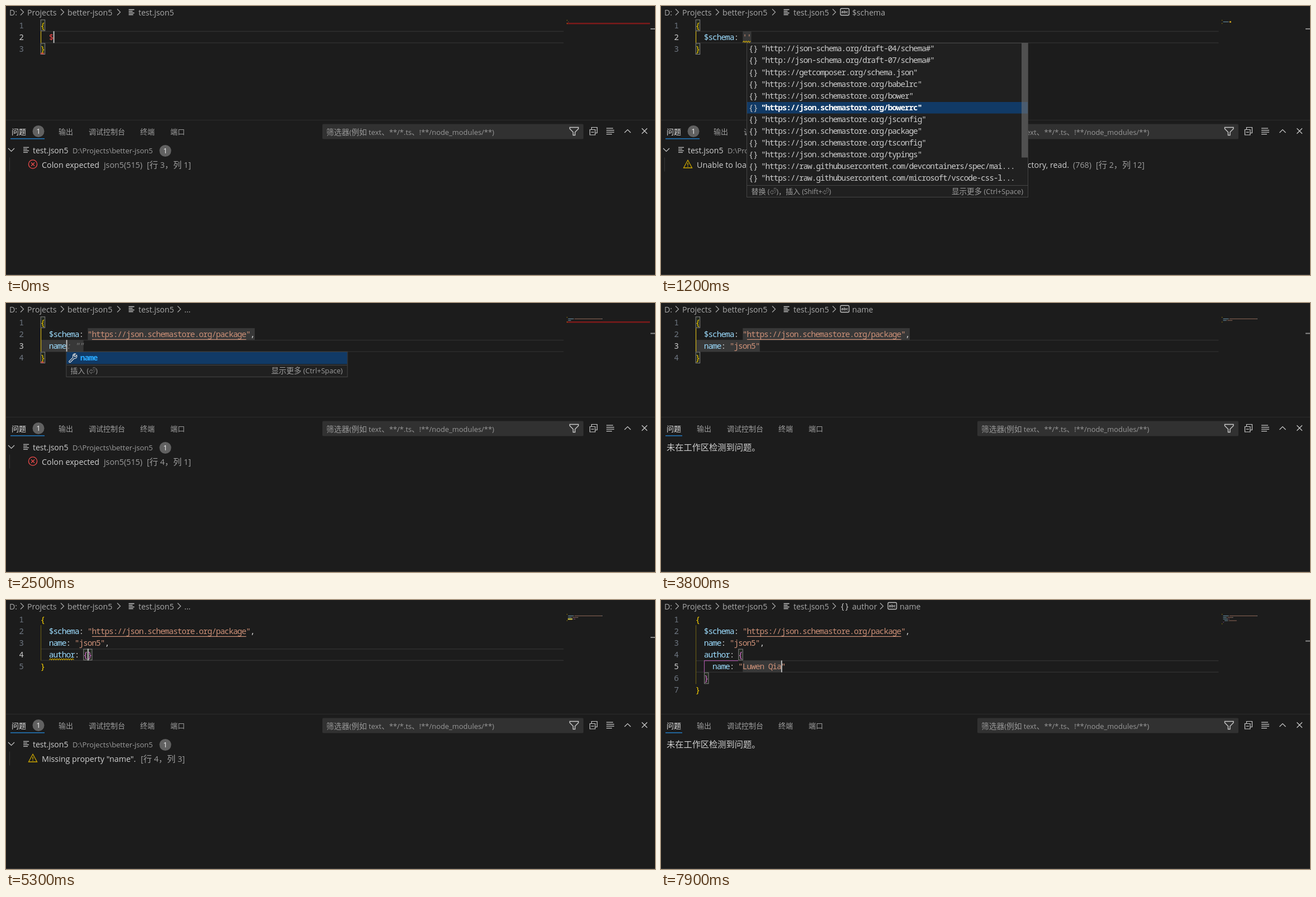
Animation, 1161 px wide and 482 px high, one loop 8000 ms. Source, as an HTML page:

```html
<!DOCTYPE html>
<html lang="zh-CN">
<head>
<meta charset="utf-8">
<title>JSON5 completion</title>
<style>
html,body{margin:0;width:100%;height:100%;overflow:hidden;background:#1c1c1c}
svg{display:block;width:100%;height:100%}
text{white-space:pre;font-family:"Open Sans","Noto Sans CJK SC","Noto Sans CJK",sans-serif}
.cjk{font-size:1.065em}
.mono{font:14.5px "Noto Sans Mono","DejaVu Sans Mono",monospace;font-stretch:condensed;text-anchor:middle}
.bold{font-weight:700}
.ghost{font-style:italic}
</style>
</head>
<body>
<svg id="stage" viewBox="0 0 1161 482"></svg>
<script>
const stage = document.getElementById('stage');
const LOOP = 8000, STEP = 100;
const X0 = 62, CELL = 7.66, Y0 = 24, ROW = 21.1;
const RED = '#f14c4c', YELLOW = '#cca700', GREY = '#9d9d9d', LIGHT = '#d4d4d4';
const colX = c => X0 + c * CELL;
const rowY = r => Y0 + r * ROW;

// Drawing helpers
const esc = s => s.replace(/&/g, '&amp;').replace(/</g, '&lt;');
const rect = (x, y, w, h, fill, more = '') =>
  `<rect x="${x}" y="${y}" width="${w}" height="${h}" fill="${fill}" ${more}/>`;
const line = (d, color, w = 1.2) =>
  `<path d="${d}" fill="none" stroke="${color}" stroke-width="${w}"/>`;
const label = (x, y, s, fill = LIGHT, size = 14.3, more = '') =>
  `<text x="${x}" y="${y}" fill="${fill}" font-size="${size}" ${more}>` +
  esc(s).replace(/[\u3000-\uffef]+/g, m => `<tspan class="cjk">${m}</tspan>`) + '</text>';
const mono = (x, y, s, fill, cls = '', cell = CELL) => {
  const xs = [...s].map((_, i) => (x + (i + .5) * cell).toFixed(2)).join(' ');
  return `<text class="mono ${cls}" x="${xs}" y="${y}" fill="${fill}">${esc(s)}</text>`;
};
const bars = (x, y, color, s = 1) =>
  line([10, 7, 10, 8].map((w, i) => `M${x} ${y + i * 3 * s}h${w * s}`).join(''), color, 1.3);
const badge = (x, y, n) => `<circle cx="${x}" cy="${y}" r="10.5" fill="#616161"/>` +
  label(x, y + 4.8, String(n), '#f8f8f8', 13, 'text-anchor="middle"');
const squiggle = (x1, x2, y, color) => {
  let d = `M${x1} ${y}`;
  for (let x = x1 + 2, i = 0; x <= x2; x += 2, i++) d += `L${x} ${y + (i % 2 ? 0 : -2.4)}`;
  return line(d, color, 1.1);
};

// Problems
const err = (r, c) => ({ icon: 'error', text: 'Colon expected', code: 'json5(515)', codeX: 175, pos: `[行 ${r}，列 ${c}]`, posX: 252 });
const missing = { icon: 'warn', text: 'Missing property "name".', pos: '[行 4，列 3]', posX: 241 };
const unloaded = {
  icon: 'warn', text: "Unable to load schema from 'd:\\Projects\\better-json5':",
  tail: 'operation on a directory, read.', code: '(768)', codeX: 737, pos: '[行 2，列 12]', posX: 778
};

// Document states
const AUTHOR = 'Luwen Qia';
const schema = '  $schema: "https://json.schemastore.org/package"';
const pkg = '  name: "json5",';
const simple = (...body) => ['{', ...body, '}'];
const nested = s => simple(schema + ',', pkg, '  author: {', s, '  }');
const urlMark = [1, 11, 50];
const beats = [
  [0, { lines: simple('  $'), row: 1, col: 3, caret: 1, crumbs: [], probs: [err(3, 1)], boxes: [[0, 0], [2, 0]],
    marks: [], waves: [[RED, 2, 0, 1]], bands: [['#7d1a1a', 2, 0, 149]], ghost: '', pop: null, list: false }],
  [2, { pop: ['$schema', 1] }],
  [4, { lines: simple("  $schema: ''"), col: 12, caret: 0, crumbs: [['abc', '$schema']], probs: [unloaded],
    marks: [[1, 11, 13]], waves: [[YELLOW, 1, 11, 13]], bands: [[YELLOW, 1, 14, 17]], pop: null, list: true }],
  [15, { lines: simple(schema), col: 49, caret: 1, probs: [], marks: [[1, 11, 49]], waves: [], bands: [], list: false }],
  [18, { lines: simple(schema + ','), col: 50, crumbs: [['', '...']], marks: [urlMark] }],
  [19, { lines: simple(schema + ',', '  '), row: 2, col: 2, boxes: [[0, 0], [3, 0]], marks: [urlMark, [2, 0, 2]] }]
];
for (let i = 1; i <= 4; i++) beats.push([21 + i, {
  lines: simple(schema + ',', '  ' + 'name'.slice(0, i)), col: 2 + i, ghost: 'name'.slice(i) + ': ""',
  pop: ['name', i], probs: [err(4, 1)], marks: [urlMark, [2, 0, 10]],
  waves: [[RED, 3, 0, 1]], bands: [['#7d1a1a', 3, 0, 149]]
}]);
beats.push([28, { ghost: '', pop: null, probs: [], waves: [], bands: [], crumbs: [['abc', 'name']] }]);
for (let i = 0; i <= 5; i++) beats.push([i ? 29 + i : 28, {
  lines: simple(schema + ',', `  name: "${'json5'.slice(0, i)}"`), col: 9 + i, marks: [urlMark, [2, 0, 10 + i]]
}]);
beats.push(
  [37, { col: 15 }],
  [38, { caret: 0 }],
  [39, { lines: simple(schema + ',', pkg), col: 16, caret: 1 }],
  [40, { lines: simple(schema + ',', pkg, '  '), row: 3, col: 2, crumbs: [['', '...']], marks: [], boxes: [[0, 0], [4, 0]] }],
  [45, { caret: 0 }],
  [46, { caret: 1 }]
);
for (let i = 1; i <= 2; i++) beats.push([48 + i, {
  lines: simple(schema + ',', pkg, '  ' + 'au'.slice(0, i)), col: 2 + i, ghost: 'author'.slice(i) + ': {}',
  pop: ['author', i], probs: [err(5, 1)], waves: [[RED, 4, 0, 1]], bands: [['#7d1a1a', 4, 0, 149]]
}]);
beats.push(
  [51, { lines: simple(schema + ',', pkg, '  author: {}'), col: 11, ghost: '', pop: null, probs: [missing],
    boxes: [[3, 10], [3, 11]], waves: [[YELLOW, 3, 2, 8]], bands: [[YELLOW, 3, 2, 10]] }],
  [54, { crumbs: [['{}', 'author']] }],
  [55, { lines: nested('    '), row: 4, col: 4, boxes: [[3, 10], [5, 2]] }],
  [58, { caret: 0 }],
  [59, { caret: 1 }]
);
for (let i = 1; i <= 2; i++) beats.push([61 + i, {
  lines: nested('    ' + 'na'.slice(0, i)), col: 4 + i, ghost: 'name'.slice(i) + ': ""', pop: ['name', i],
  probs: [err(6, 3), missing], marks: [[4, 0, 12], [5, 0, 3]],
  waves: [[YELLOW, 3, 2, 8], [RED, 5, 2, 3]], bands: [['#7d6a10', 3, 0, 149], ['#7d1a1a', 5, 0, 149]]
}]);
beats.push([68, { ghost: '', pop: null, probs: [], waves: [], bands: [], crumbs: [['{}', 'author'], ['abc', 'name']] }]);
for (let i = 0; i <= AUTHOR.length; i++) beats.push([i ? 70 + i : 68, {
  lines: nested(`    name: "${AUTHOR.slice(0, i)}"`), col: 11 + i, marks: [[4, 11, 11 + i]]
}]);

const stateAt = step => Object.assign({}, ...beats.filter(b => b[0] <= step).map(b => b[1]));

function tokens(text) {
  return [...text.matchAll(/"[^"]*"?|'[^']*'?|[\w$]+|[{}]|[:,]/g)].map(m => {
    const s = m[0], col = m.index;
    let color = '#9cdcfe';
    if (/["']/.test(s)) color = '#ce9178';
    else if (/[{}]/.test(s)) color = col ? '#da70d6' : '#ffd700';
    else if (/[:,]/.test(s)) color = LIGHT;
    else if (s === '$') color = '#f44747';
    return { s, col, color };
  });
}

// Breadcrumbs
const chevron = x => line(`M${x - 3} 5.5l5.5 5.5l-5.5 5.5`, '#a9a9a9');
function breadcrumbs(crumbs) {
  let out = label(6, 17, 'D:', '#a9a9a9', 14.1) + chevron(29) + label(38, 17, 'Projects', '#a9a9a9', 14.1) +
    chevron(101) + label(110, 17, 'better-json5', '#a9a9a9', 14.1) + chevron(202) +
    bars(219.5, 6.5, '#c5c5c5') + label(237, 17, 'test.json5', '#a9a9a9', 14);
  crumbs.forEach(([icon, name], i) => {
    const x = 310 + i * 85;
    out += chevron(x);
    if (icon === 'abc') out += rect(x + 11, 4.5, 15.5, 12, 'none', 'rx="2" stroke="#c5c5c5" stroke-width="1.3"') +
      label(x + 18.7, 13, 'abc', '#c5c5c5', 7, 'text-anchor="middle" font-weight="700"');
    if (icon === '{}') out += mono(x + 10.5, 16, '{}', '#c5c5c5', '', 8);
    out += label(x + (icon ? 32 : 9), 17, name, '#a9a9a9', 14.1);
  });
  return out;
}

function editor(s) {
  const last = s.lines.length - 1, inner = s.row === 4, dim = s.row === 4 || s.boxes[0][0] === 3;
  const y = rowY(s.row);
  let out = line(`M${X0} ${y + .4}H997.5M${X0} ${y + ROW - .2}H997.5`, '#2f2f2f', 1.4);
  for (const [r, a, b] of s.marks) out += rect(colX(a), rowY(r), (b - a) * CELL, ROW, '#383838');
  for (const [r, c] of s.boxes) out += rect(colX(c) + .2, rowY(r) + .8, CELL - .2, ROW - 1.6, '#23291f', 'stroke="#858585"');
  out += line(`M62.5 ${rowY(1)}V${rowY(last)}`, dim ? '#655a16' : '#d3b51c');
  if (inner) out += line(`M138 ${y + .2}H77.5V${y + ROW}`, '#a757a5');
  s.lines.forEach((text, r) => {
    const base = +(rowY(r) + 15.7).toFixed(2);
    out += mono(23.8, base, String(r + 1), r === s.row ? '#cccccc' : '#6e7681');
    for (const t of tokens(text)) {
      out += mono(colX(t.col), base, t.s, t.color);
      if (t.s.startsWith('"https')) out += rect(colX(t.col + 1), base + 4, (t.s.length - 2) * CELL, 1.2, t.color);
    }
  });
  if (s.ghost) out += mono(colX(s.col), y + 15.7, s.ghost, '#7c7c7c', 'ghost');
  for (const [c, r, a, b] of s.waves) out += squiggle(colX(a), colX(b), rowY(r + 1) - 1, c);
  if (s.caret) out += rect(colX(s.col) - .3, y, 1.8, ROW, '#c8c8c8');
  return out;
}

function minimap(s) {
  const at = r => 24.2 + 2.85 * r;
  let out = '';
  for (const [c, r, a, b] of s.bands) out += rect(1003 + a, at(r) + .2, b - a, 2.5, c);
  s.lines.forEach((text, r) => {
    for (const t of tokens(text))
      out += rect(1003 + t.col * 1.28, at(r) + .8, t.s.length * 1.28, 1.2, t.color, 'opacity=".55"');
  });
  return out + rect(1153, [0, 40, 53.5, 66, 72.5][s.row], 8, 2, '#8a8a8a');
}

function problem(p, i) {
  const y = 283.5 + i * 25.6, base = y + 6;
  let out = line(`M6.5 ${y - 12}v25`, '#363636', 1);
  if (p.icon === 'error')
    out += `<circle cx="48" cy="${y}" r="7.6" fill="none" stroke="${RED}" stroke-width="1.3"/>` +
      line(`M45 ${y - 3}l6 6m0 -6l-6 6`, RED);
  else
    out += line(`M48 ${y - 7.2}L55.5 ${y + 6.5}H40.5Z`, YELLOW, 1.3) + line(`M48 ${y - 2.5}v4.5m0 1.3v1.5`, YELLOW, 1.4);
  out += label(64, base, p.text, '#d0d0d0');
  if (p.tail) out += label(730, base, p.tail, '#d0d0d0', 14.3, 'text-anchor="end"');
  if (p.code) out += label(p.codeX, base, p.code, GREY);
  return out + label(p.posX, base, p.pos, GREY);
}

function panel(probs) {
  const n = probs.length, shift = n ? 30 : 0;
  let out = rect(0, 204, 1161, 1, '#2c2c2c') + label(10, 230, '问题', '#e7e7e7', 12.2);
  if (n) out += badge(58, 224.5, n);
  out += rect(8, 237.2, n ? 61 : 30, 1.3, '#2489db');
  [[64, '输出'], [118, '调试控制台'], [210, '终端'], [264, '端口']]
    .forEach(([x, name]) => out += label(x + shift, 230, name, GREY, 12.2));
  out += rect(566, 211.5, 467, 27, '#313131', 'rx="2"') +
    label(573, 230.5, '筛选器(例如 text、**/*.ts、!**/node_modules/**)', '#989898', 12.9) +
    line('M1008.5 217.5h15.5v2.5l-6 6v5.5h-3.5v-5.5l-6 -6z', '#c8c8c8', 1.4) +
    line('M1047.5 221v-3.5h10v10h-3.5M1044.5 221.5h9.5v9.5h-9.5zM1046.8 226.2h5', '#c8c8c8') +
    line('M1074 219.2h12M1074 222.7h14M1074 226.2h14M1074 229.7h10', '#c8c8c8') +
    line('M1106.5 227l5.5 -5.5l5.5 5.5', '#c8c8c8') +
    line('M1137.5 219.2l9.5 9.5m0 -9.5l-9.5 9.5', '#c8c8c8', 1.3);
  if (!n) return out + label(10, 264, '未在工作区检测到问题。', '#d0d0d0', 14.3);
  return out + line('M4 255l5.5 5.5l5.5 -5.5', '#c8c8c8') + bars(31, 253.3, '#c5c5c5') +
    label(48, 264, 'test.json5', '#d0d0d0', 14) + label(119, 264, 'D:\\Projects\\better-json5', GREY, 12.9) +
    badge(285, 259.5, n) + probs.map(problem).join('');
}

// Suggestion widgets
const frame = (x, y, w, h) => rect(x + .5, y + .5, w, h, '#202020', 'stroke="#454545"');
const more = (x, y) => label(x, y, '显示更多 (Ctrl+Space)', GREY, 12.7, 'text-anchor="end"');

function suggestion(s) {
  const [word, hit] = s.pop, x = colX(s.col) - .6, y = rowY(s.row + 1) - .4;
  return frame(x, y, 503, 45) + rect(x + 1, y + 1, 502, 21.5, '#113a66') +
    line(`M${x + 5.5} ${y + 17.5}l7 -7q-1.5 -5 3 -6.5l1.5 .2l-3 3l2 2.2l3.2 -2.8q1.5 6 -5 6.2l-6.7 6.7q-2.4 .3 -2 -2z`, '#d8d8d8', 1.3) +
    mono(x + 26, y + 16, word.slice(0, hit), '#2aaaff', 'bold') +
    mono(x + 26 + hit * CELL, y + 16, word.slice(hit), '#ffffff', 'bold') +
    rect(x + 1, y + 24, 502, 1, '#454545') + label(x + 8, y + 39.5, '插入 (⏎)', GREY, 12.2) + more(x + 495, y + 39.5);
}

const store = 'https://json.schemastore.org/', raw = 'https://raw.githubusercontent.com/';
const schemas = [
  ...['04', '07'].map(v => `"http://json-schema.org/draft-${v}/schema#"`),
  '"https://getcomposer.org/schema.json"',
  ...['babelrc', 'bower', 'bowerrc', 'jsconfig', 'package', 'tsconfig', 'typings'].map(n => `"${store}${n}"`),
  `"${raw}devcontainers/spec/mai.…`, `"${raw}microsoft/vscode-css-l.…`, `"${raw}microsoft/vscode-ext.…`
];
function schemaList(sel) {
  let out = frame(153, 66, 503, 276) + '<clipPath id="rows"><rect x="153" y="66" width="504" height="255.5"/></clipPath><g clip-path="url(#rows)">';
  schemas.forEach((name, i) => {
    const y = 66 + i * ROW, on = i === sel;
    if (on) out += rect(154, y + .5, 502, ROW - .5, '#113a66');
    out += mono(157, y + 15.3, '{}', '#c8c8c8', '', 8.2) +
      mono(179.5, y + 15.3, name.replace('…', '..'), on ? '#ffffff' : '#cccccc', on ? 'bold' : '', 7.56);
  });
  return out + '</g>' + rect(645, 66.5, 11, 205, '#797979', 'opacity=".55"') + rect(154, 321, 502, 1, '#454545') +
    label(161.5, 337, '替换 (⏎)，插入 (Shift+⏎)', GREY, 12.2) + more(648, 337);
}

let shown = -1;
function draw(now) {
  const step = Math.floor(now % LOOP / STEP);
  if (step !== shown) {
    shown = step;
    const s = stateAt(step);
    stage.innerHTML = rect(0, 0, 1161, 482, '#1c1c1c') + rect(0, 481, 1161, 1, '#383838') +
      breadcrumbs(s.crumbs) + editor(s) + minimap(s) + panel(s.probs) +
      (s.list ? schemaList(Math.max(0, step - 7)) : '') + (s.pop ? suggestion(s) : '');
  }
}
const start = performance.now();
function tick() {
  draw(performance.now() - start);
  requestAnimationFrame(tick);
}
tick();
</script>
</body>
</html>
```
